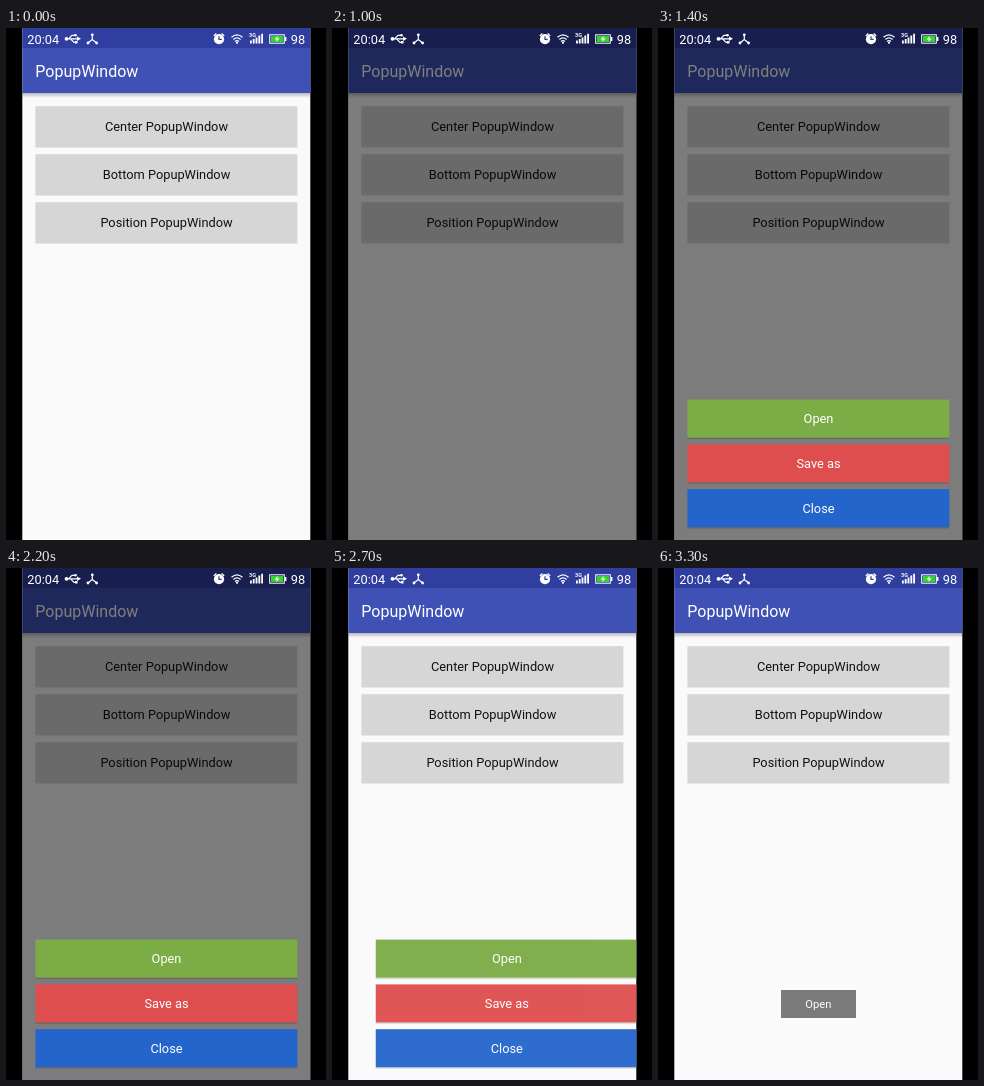
Write an HTML page that moves like this. It is 320 px wide and 512 px high and loops after 3400 ms.

```html
<!DOCTYPE html>
<html lang="en">
<head>
<meta charset="utf-8">
<title>PopupWindow</title>
<style>
  html, body { margin: 0; width: 100%; height: 100%; overflow: hidden; background: #000; }
  svg { display: block; width: 100vw; height: 100vh; }
  text { font: 12.8px Roboto, sans-serif; }
  .mid { text-anchor: middle; }
  .title { font-size: 16px; }
  .line { fill: none; stroke: #fff; stroke-width: 1.2; }
</style>
</head>
<body>
<svg viewBox="0 0 320 512">
  <defs>
    <clipPath id="screen"><rect x="16.3" width="288" height="512"/></clipPath>
    <linearGradient id="shade" x2="0" y2="1">
      <stop offset="0" stop-opacity=".26"/>
      <stop offset="1" stop-opacity="0"/>
    </linearGradient>
  </defs>
  <rect width="320" height="512"/>
  <g clip-path="url(#screen)">
    <rect x="16" width="289" height="512" fill="#fafafa"/>
    <rect x="16" y="65" width="289" height="5" fill="url(#shade)"/>
    <rect x="16" y="20" width="289" height="45" fill="#3f51b5"/>
    <rect x="16" width="289" height="20" fill="#303f9f"/>
    <text class="title" x="29.3" y="49.3" fill="#fff">PopupWindow</text>
    <g id="menu"></g>
    <rect id="dim" x="16" width="289" height="512" opacity="0"/>

    <g fill="#fff">
      <text x="21.3" y="15.6">20:04</text>
      <text x="284.8" y="15.6">98</text>
      <!-- cable -->
      <path class="line" d="M60 10.8H72M62.5 10.8L66 7.3H69M64.5 10.8L68 14.3H70"/>
      <circle cx="60.5" cy="10.8" r="1.9"/>
      <path d="M71 8.5L75 10.8L71 13.1Z"/>
      <circle cx="69.5" cy="7.3" r="1.3"/>
      <rect x="69" y="13" width="2.5" height="2.5"/>
      <!-- hub -->
      <path class="line" d="M86.3 7V11.5L82 15M86.3 11.5L90.6 15"/>
      <circle cx="86.3" cy="6.8" r="1.4"/>
      <circle cx="82" cy="15" r="1.4"/>
      <circle cx="90.6" cy="15" r="1.4"/>
      <!-- alarm -->
      <circle cx="213" cy="11.2" r="5.1"/>
      <path class="line" d="M207.8 8L210.3 5.4M218.2 8L215.7 5.4"/>
      <path class="line" d="M213 8.2V11.4H215.7" style="stroke:#303f9f"/>
      <!-- wireless -->
      <path class="line" d="M225.5 9.3Q231 4.5 236.5 9.3M227.4 11.5Q231 8.4 234.6 11.5M229 13.5Q231 11.8 233 13.5"/>
      <circle cx="231" cy="14.8" r="1.1"/>
      <!-- signal -->
      <text x="243" y="9.2" style="font-size:5.5px;font-weight:700">3G</text>
      <path d="M244 12.5h1.8V15.5h-1.8zM246.8 11h1.8v4.5h-1.8zM249.6 9.5h1.8v6h-1.8zM252.4 7.5h1.8v8h-1.8zM255.2 5.7h1.8v9.8h-1.8z"/>
      <!-- battery -->
      <rect class="line" x="263.7" y="6.8" width="14.6" height="8.4" style="stroke-width:1"/>
      <rect x="278.8" y="9" width="1.6" height="4"/>
      <rect x="265" y="8" width="12" height="6" fill="#35d32f"/>
      <path d="M272 7.8L268.5 11.5H271L270 14.2L273.7 10.5H271.2Z"/>
    </g>

    <g id="popup" opacity="0"></g>

    <g id="toast" opacity="0">
      <rect x="123" y="422" width="75" height="28" fill="#7b7b7b"/>
      <text class="mid" x="160.3" y="440.2" fill="#fff" style="font-size:11.2px">Open</text>
    </g>
  </g>
</svg>
<script>
  const LOOP = 3400, STEP = 100, SLIDE = 288;
  const $ = id => document.getElementById(id);

  const button = (y, height, shadow, fill, ink, label) => `
    <rect x="29.4" y="${y + height}" width="262" height="${shadow}" fill="url(#shade)"/>
    <rect x="29.4" y="${y}" width="262" height="${height}" fill="${fill}"/>
    <text class="mid" x="160.5" y="${y + height / 2 + 4.7}" fill="${ink}">${label}</text>`;

  $('menu').innerHTML = ['Center', 'Bottom', 'Position']
    .map((place, i) => button(78.2 + 48 * i, 40.8, 0.8, '#d6d6d6', '#111', place + ' PopupWindow')).join('');

  $('popup').innerHTML = [['#7cac45', 'Open'], ['#df4e4e', 'Save as'], ['#2465cb', 'Close']]
    .map(([fill, label], i) => button(371.6 + 44.8 * i, 38, 2, fill, '#fff', label)).join('');

  const ramp = (t, from, to) => Math.min(1, Math.max(0, (t - from) / (to - from)));
  const ease = p => (1 - Math.cos(Math.PI * p)) / 2;

  function draw(now) {
    // The screen refreshes ten times a second.
    const t = Math.floor((now % LOOP) / STEP) * STEP;
    const enter = ease(ramp(t, 1050, 1350));
    const leave = ease(ramp(t, 2657, 2957));

    $('dim').setAttribute('opacity', 0.5 * (ramp(t, 800, 1000) - ramp(t, 2390, 2610)));
    $('popup').setAttribute('opacity', enter - leave);
    $('popup').setAttribute('transform', `translate(${SLIDE * (enter - 1 + leave)} 0)`);
    $('toast').setAttribute('opacity', ramp(t, 2960, 3300));
  }

  function tick() {
    draw(performance.now());
    requestAnimationFrame(tick);
  }
  tick();
</script>
</body>
</html>
```
